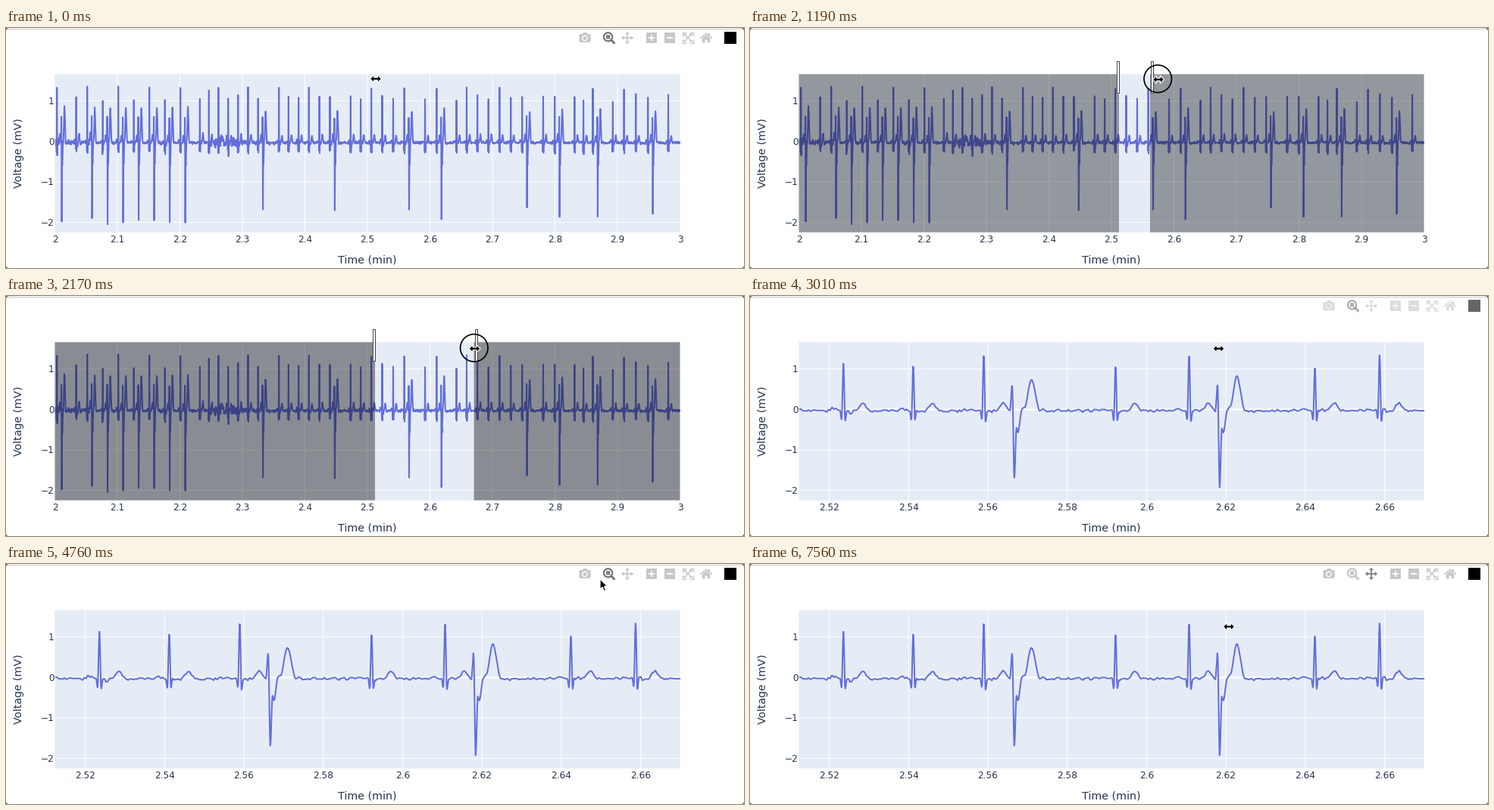
A matplotlib script that plays this animation: 974 by 318 pixels, repeating every 8 s.

```python
import numpy as np
import matplotlib.pyplot as plt
from matplotlib.animation import FuncAnimation
from matplotlib.patches import Circle, FancyBboxPatch, Polygon, Rectangle

W, H, STEP, LOOP, INTERVAL = 974, 318, 70, 8000, 20
LEFT, RIGHT, TOP, BOTTOM = 64.5, 889.5, 61.2, 270.7
PT = 0.72  # points per pixel at 100 dpi
INK, TRACE, TIP = "#26344f", "#636edb", "#69738a"
PALE, DARK = "#c7c7c7", "#7a7a7a"

fig = plt.figure(figsize=(W / 100, H / 100), dpi=100, facecolor="white")
ax = fig.add_axes([0, 0, 1, 1])
ax.set_xlim(0, W)
ax.set_ylim(H, 0)
ax.axis("off")


def add(patch):
    return ax.add_patch(patch)


def line(xs, ys, color, width, z=2, **kw):
    return ax.plot(xs, ys, color=color, lw=width * PT, zorder=z, **kw)[0]


def poly(points, color, z=10, edge="none", width=0.0):
    return add(Polygon(points, closed=True, fc=color, ec=edge, lw=width * PT, zorder=z))


def rect(x, y, w, h, color, z=10, **kw):
    return add(Rectangle((x, y), w, h, fc=color, lw=kw.pop("width", 0) * PT, zorder=z, **kw))


def label(x, y, s, size=12.15, color=INK, ha="center", z=3, **kw):
    return ax.text(x, y, s, fontsize=size * PT, color=color, ha=ha, va="baseline",
                   family="DejaVu Sans", zorder=z, **kw)


def ypix(v):
    return 150.4 - 53.6 * v


# ---- heart signal, 5236 samples units per minute
SPAN = 5236
rng = np.random.default_rng(4)
u = np.arange(0, SPAN + 0.5, 0.5)
volt = np.full(u.size, -0.03)
rough = np.full(u.size, 0.017)


def keyed(center, keys):
    """Add a pulse that eases from one (offset, level) key to the next."""
    dx, dy = np.array(keys).T
    s = u - center
    m = (s >= dx[0]) & (s < dx[-1])
    i = np.searchsorted(dx, s[m], side="right") - 1
    f = (s[m] - dx[i]) / (dx[i + 1] - dx[i])
    volt[m] += dy[i] + (dy[i + 1] - dy[i]) * f * f * (3 - 2 * f)


def bell(center, width):
    return np.exp(-0.5 * ((u - center) / width) ** 2)


def normal_beat(px):
    c = (px - 65) * SPAN / 825
    top = 1.17 + 0.17 * np.cos(2 * np.pi * (px - 569) / 42)  # breathing
    keyed(c, [(-4.6, 0), (-2.5, -0.22), (0, top + 0.05), (2.3, -0.25), (4.5, 0)])
    volt[:] += 0.19 * bell(c + 25.3, 3.8) + 0.05 * bell(c - 15, 2.2)
    rough[:] += 0.025 * bell(c + 7, 3.5)


def early_beat(px, gap):
    c = (px - 65) * SPAN / 825
    deep, wave = 2.07 - 0.0038 * gap, 0.86 - 0.0012 * gap
    keyed(c, [(-5.5, 0), (-2.5, 0.64), (0.3, 0.03 - deep), (3.2, -0.44), (5, -0.55),
              (10.5, 0.02), (14, 0.1), (22.8, wave + 0.03), (34, 0)])


# Early beats in pixels of the wide view: first every second beat, then scattered.
# Normal beats fill the time between a pause and the next early beat.
early = [74, *(114 + 20.5 * np.arange(7)), 339.5, 434.3, 532.45, 575.15, 688, 731, 781.3, 854]
prev, first = 65, 65
for px in early:
    gap, last = px - prev, px - 6.3
    n = round((last - first) / 13.4) if last - first > 7 else 0
    for k in range(n + 1):
        normal_beat(first + (last - first) * (k / n) ** 1.04 if n else last)
    early_beat(px, gap)
    prev, first = px, px + 18.9 + 0.0225 * gap
normal_beat(first)

rough += 0.022 * bell(120, 180) + 0.05 * bell(1430, 100)
knots = np.arange(0, SPAN + 4, 2.4)
volt += rough * np.interp(u, knots, rng.normal(size=knots.size))

# ---- chart
frame = rect(LEFT, TOP, RIGHT - LEFT, BOTTOM - TOP, "#e5ecf6", z=1, snap=False)
for v in (1, 0, -1, -2):
    line([LEFT, RIGHT], [ypix(v)] * 2, "white", 2 if v == 0 else 1, snap=False)
    label(63.5, ypix(v) + 4.5, str(v).replace("-", "\u2212"), ha="right")
label(477, 311.3, "Time (min)", 14.25)
label(21, 166, "Voltage (mV)", 14.25, rotation=90, rotation_mode="anchor")


def view(start, scale, ticks):
    xs = LEFT + (2 + u / SPAN - start) * scale
    m = (xs > LEFT - 5) & (xs < RIGHT + 5)
    trace = line(xs[m], ypix(volt[m]), TRACE, 2, 4, solid_joinstyle="round")
    trace.set_clip_path(frame)
    parts = [trace]
    for v in ticks:
        x = LEFT + (v - start) * scale
        if LEFT + 2 < x < RIGHT - 2:
            parts.append(line([x, x], [TOP, BOTTOM], "white", 1, snap=False))
        parts.append(label(x, 284.3, f"{v:g}"))
    return parts


wide = view(2, 825, np.round(np.arange(2, 3.01, 0.1), 1))
close = view(2.51236, SPAN, np.round(np.arange(2.52, 2.67, 0.02), 2))

# ---- window edge
line([0, W], [0.5, 0.5], "#cdcdcd", 1)
for cx, sx in ((0, 1), (W, -1)):
    for cy, sy in ((0, 1), (H, -1)):
        r = 4 if cy == 0 else 2.5
        poly([(cx, cy), (cx + sx * r, cy), (cx + sx, cy + sy), (cx, cy + sy * r)], "#555555")

# ---- drag selection
START = 487
shades = [rect(LEFT, TOP, 1, BOTTOM - TOP, "black", z=6, snap=False) for _ in range(2)]
grips = [rect(START - 3.5, 43.5, 3, 42, "white", z=7, ec="#444444", width=1) for _ in range(2)]

# ---- toolbar
camera = [
    add(FancyBboxPatch((757, 8.5), 14, 10, boxstyle="round,pad=0,rounding_size=1.5",
                       fc=PALE, ec=PALE, lw=PT, zorder=10)),
    poly([(760.5, 8.5), (762, 6), (766.5, 6), (768, 8.5)], PALE),
    add(Circle((764, 13.4), 3.9, fc="white", lw=0, zorder=11)),
    add(Circle((764, 13.4), 2.5, fc=PALE, lw=0, zorder=12)),
]
zoom = [
    add(Circle((794.6, 11.8), 5.6, fc="none", lw=2.3 * PT, zorder=10)),
    line([798.8, 802.4], [16, 19.6], PALE, 3, 10),
    rect(792, 9.2, 5.2, 5.2, PALE, snap=False),
]
pan = [line([820, 820], [7, 19], PALE, 1.7, 10), line([814, 826], [13, 13], PALE, 1.7, 10)]
for dx, dy in ((0, -1), (0, 1), (-1, 0), (1, 0)):
    tip = np.array([820 + 8 * dx, 13 + 8 * dy])
    back = np.array([820 + 4.8 * dx, 13 + 4.8 * dy])
    side = 3.1 * np.array([dy, dx])
    pan.append(poly([tip, back + side, back - side], PALE))
scales = [rect(851, 9, 2, 8, "white", 11)]
for x in (845, 869):
    scales += [rect(x, 6, 14, 14, PALE), rect(x + 3, 12, 8, 2, "white", 11)]
fit = []
for sx in (-1, 1):
    fit.append(line([900 - 4.8 * sx, 900 + 4.8 * sx], [8.2, 17.8], PALE, 1.5, 10))
    for sy in (-1, 1):
        x, y = 900 + 7.3 * sx, 13 + 7.3 * sy
        fit.append(line([x - 4 * sx, x, x], [y, y, y - 4 * sy], PALE, 1.4, 10))
        x, y = 900 + 5.4 * sx, 13 + 5.4 * sy
        fit.append(poly([(x, y), (x - 3.6 * sx, y), (x, y - 3.6 * sy)], PALE))
home = [
    line([916.8, 924, 931.2], [13.6, 7.3, 13.6], PALE, 1.7, 10),
    poly([(919, 13.8), (924, 9.4), (929, 13.8), (929, 19.3), (925.6, 19.3), (925.6, 15.5),
          (922.4, 15.5), (922.4, 19.3), (919, 19.3)], PALE),
    rect(927.3, 7.4, 1.9, 4, PALE),
]
badge = [rect(948, 5, 16, 16, "black")]
toolbar = camera + zoom + pan + scales + fit + home + badge


def tooltip(cx, width, text):
    x = cx + 18 - width
    return [
        add(FancyBboxPatch((x + 2, 28), width - 4, 24, boxstyle="round,pad=2,rounding_size=2",
                           fc=TIP, lw=0, zorder=14)),
        poly([(cx - 6, 26.2), (cx, 20), (cx + 6, 26.2)], TIP, 14),
        label(x + width / 2, 44.4, text, color="white", z=15),
    ]


zoom_tip = tooltip(796, 55, "Zoom")
pan_tip = tooltip(820, 46, "Pan")

# ---- pointer
RESIZE = np.array([(-7.6, 0), (-2.4, -5.2), (-2.4, -1.8), (2.4, -1.8), (2.4, -5.2),
                   (7.6, 0), (2.4, 5.2), (2.4, 1.8), (-2.4, 1.8), (-2.4, 5.2)])
ARROW = np.array([(0, 0), (0, 13.6), (3.1, 10.8), (5.3, 16), (7.6, 15), (5.5, 10), (9.6, 9.8)])
HAND = np.array([(-1.5, 0.5), (0, -0.5), (1.5, 0.5), (1.5, 5.5), (5, 6), (8, 7), (9, 8.5),
                 (9, 12), (7.5, 16), (0, 16), (-2.5, 12), (-5, 8.8), (-4, 7.6), (-1.5, 9.5)])
pointer = poly(RESIZE, "black", 20, width=1.2)
ring = add(Circle((0, 0), 18.2, fc="none", ec="black", lw=1.7 * PT, zorder=19))

# begin, end, goal, sharpness of the slowing down
MOVES = [
    (700, 2170, (618.5, 69.7), 4.2),
    (4060, 4900, (800, 15), 2.05),
    (4900, 5180, (829, 17), 2),
    (6160, 7280, (632, 83), 6.6),
]


def pos(t):
    p = np.array([488, 67.3])
    for begin, end, goal, sharp in MOVES:
        s = np.clip((t - begin) / (end - begin), 0, 1)
        p = p + (np.array(goal) - p) * (1 - (1 - s * s) ** sharp)
    return p


def show(parts, on):
    for p in parts:
        p.set_visible(bool(on))


def update(i):
    t = (i * INTERVAL + INTERVAL // 2) // STEP * STEP
    p = pos(t)
    x, y = p

    zoomed = t >= 3010
    show(wide, not zoomed)
    show(close, zoomed)

    # the selection trails the pointer a little
    end = max(pos(t - 60)[0] - 0.9, START)
    show(shades + grips, 840 <= t < 3010)
    shades[0].set_width(START - LEFT)
    shades[1].set_x(end)
    shades[1].set_width(RIGHT - end)
    for s in shades:
        s.set_alpha(float(np.interp(t, [840, 1190, 1330], [0.05, 0.355, 0.4])))
    grips[1].set_x(round(end) + 0.5)

    alpha = float(np.interp(t, [630, 910, 2940, 3010, 3220], [1, 0, 0, 0.6, 1]))
    show(toolbar, alpha > 0)
    for a in toolbar:
        a.set_alpha(alpha)

    on_zoom = y < 24 and 786 < x < 808
    on_pan = y < 24 and 808 <= x < 834
    show(zoom_tip, on_zoom)
    show(pan_tip, on_pan)
    panning = t >= 5670
    z_color = DARK if on_zoom or not panning else PALE
    p_color = DARK if on_pan or panning else PALE
    zoom[0].set_edgecolor(z_color)
    for a in zoom[1:]:
        a.set_color(z_color)
    for a in pan:
        a.set_color(p_color)

    hand = on_zoom or on_pan
    pointer.set_xy((RESIZE if y > TOP else HAND if hand else ARROW) + p)
    pointer.set_facecolor("white" if hand else "black")
    pointer.set_edgecolor("black" if hand else "white")
    ring.set_center((x - 0.7, y - 0.9))
    ring.set_visible(700 <= t < 2870 or 5670 <= t < 5810)
    return []


anim = FuncAnimation(fig, update, frames=LOOP // INTERVAL, interval=INTERVAL,
                     init_func=lambda: update(0), repeat=True, repeat_delay=0)
plt.show()
```
